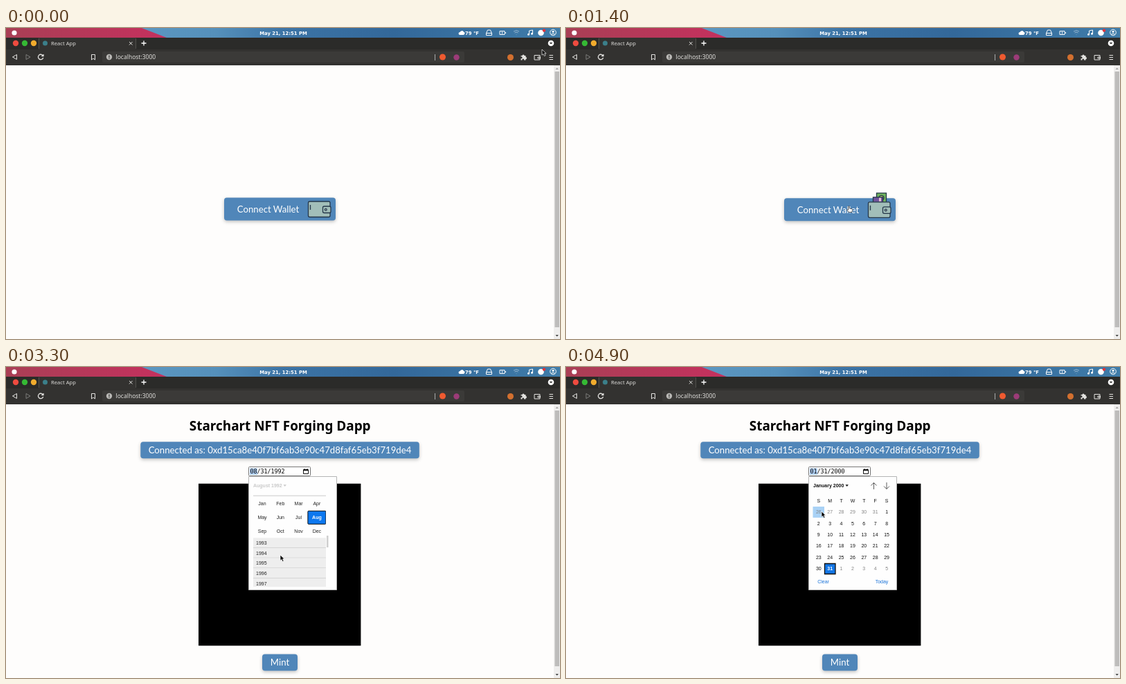
Recreate the animation shown at these times as an HTML page. Size 800 by 450 pixels, loop 5 s.

```html
<!DOCTYPE html>
<html lang="en">
<head>
<meta charset="utf-8">
<title>React App</title>
<style>
  html, body { margin: 0; width: 100%; height: 100%; overflow: hidden; background: #fefdfc; }
  svg { display: block; }
  .sys { font: bold 6.85px "DejaVu Sans", sans-serif; fill: #fff; }
  .ui { font-family: "Noto Sans", sans-serif; fill: #deddda; }
  .btn { fill: #5086b9; filter: drop-shadow(0 2px 2.5px rgba(0, 0, 0, .24)); }
  .lato { font: 13.2px Lato, sans-serif; fill: #fff; }
  .title { font: bold 18.9px "Noto Sans", "Open Sans", sans-serif; }
  .date { font: 8.3px "DejaVu Sans Mono", monospace; }
  .pick { font: 7px "Liberation Sans", Arial, sans-serif; }
  .mid { text-anchor: middle; }
  .bold { font-weight: bold; }
  .line { fill: none; stroke: #e4e3e0; stroke-width: 1; }
  .ink { stroke: #25374a; stroke-width: 1.3; }
</style>
</head>
<body>
<svg width="800" height="450" viewBox="0 0 800 450">
  <defs>
    <linearGradient id="red"><stop stop-color="#a93f55"/><stop offset="1" stop-color="#c5305e"/></linearGradient>
    <linearGradient id="blue">
      <stop offset=".25" stop-color="#5b97c1"/><stop offset=".38" stop-color="#5590bb"/><stop offset=".5" stop-color="#3c74a6"/>
      <stop offset=".7" stop-color="#33689a"/><stop offset="1" stop-color="#3f7ca9"/>
    </linearGradient>
    <clipPath id="listClip"><path d="M357 185h105v133h-105z"/></clipPath>
  </defs>

  <!-- desktop bar -->
  <path fill="url(#blue)" d="M0 0h800v14H0z"/>
  <path fill="url(#red)" d="M0 0H196L232 14H0z"/>
  <circle cx="12" cy="7" r="3.6" fill="#fff"/>
  <text class="sys mid" x="400.5" y="9.5">May 21, 12:51 PM</text>
  <path fill="#fff" d="M655.5 10a2 2 0 0 1 0-4a3 3 0 0 1 5.3-.5a2.3 2.3 0 0 1-.3 4.5z"/>
  <text class="sys" x="663" y="9.5">79 °F</text>
  <g class="line" style="stroke:#fff">
    <path d="M693.5 7.5l2-4.5h4l2 4.5v3h-8zM693.5 7.5h8"/>
    <path d="M713 4.5h7v5h-7zM721.5 6v2M716.5 5.5v3"/>
    <path opacity=".45" d="M733 5q4-3 8 0M734.5 7q2.5-2 5 0M737 9.5v.6"/>
    <path d="M755.5 9V4l5-1v5"/>
    <circle cx="790" cy="6.5" r="4.3"/><path d="M787 9.5q3-3 6 0"/>
  </g>
  <g fill="#fff">
    <circle cx="754.5" cy="9.3" r="1.5"/><circle cx="759.5" cy="8.3" r="1.5"/>
    <circle cx="790" cy="5.3" r="1.5"/><circle cx="772.5" cy="7" r="4.3"/>
  </g>
  <circle cx="777" cy="3.5" r="2.2" fill="#e0343c"/>

  <!-- browser -->
  <path fill="#2b2b29" d="M0 14h800v17H0z"/>
  <path fill="#333230" d="M0 31h800v23H0zM47 14h140v17H47z"/>
  <path stroke="#51504d" d="M47.5 15v15M187.5 15v15"/>
  <circle cx="14" cy="22" r="4.2" fill="#ee4b3f"/>
  <circle cx="27" cy="22" r="4.2" fill="#35b934"/>
  <circle cx="40" cy="22" r="4.2" fill="#f0ab2d"/>
  <circle cx="56.5" cy="22" r="3.5" fill="#3b7f8a"/>
  <text class="ui" x="65" y="24.8" font-size="7.6">React App</text>
  <path class="line" d="M178 20l4.5 4.5M182.5 20l-4.5 4.5"/>
  <path class="line" style="stroke:#fff;stroke-width:1.3" d="M195.5 22h7M199 18.5v7"/>
  <circle cx="787" cy="22" r="4.3" fill="#fff"/>
  <path fill="#2b2b29" d="M784.8 21h4.400l-2.200 2.600z"/>
  <rect x="139" y="34" width="523" height="16" rx="2" fill="#3b3a38"/>
  <path class="line" d="M15.5 38.5v7l-6-3.5z"/>
  <path class="line" opacity=".4" d="M29 38.5v7l6-3.5z"/>
  <path class="line" style="stroke-width:1.3" d="M53.3 40a3.700 3.700 0 1 0 .4 3M54 38v2.700h-2.700"/>
  <path class="line" d="M123.500 38.500h5v7.500l-2.500-2-2.500 2z"/>
  <circle cx="149" cy="42" r="4.2" fill="#b9b8b5"/>
  <path stroke="#3b3a38" stroke-width="1.2" d="M149 39.500v3.200M149 43.600v1.200"/>
  <text class="ui" x="158.5" y="45" font-size="8.5">localhost:3000</text>
  <path stroke="#aaa" d="M619.500 38v9"/>
  <circle cx="630.5" cy="42" r="4.5" fill="#ef5a30"/>
  <circle cx="650.5" cy="42.5" r="4.2" fill="#9c3b78"/>
  <circle cx="728.5" cy="42.5" r="4.5" fill="#d3702f"/>
  <path fill="#e4e3e0" d="M743.500 40h2a1.500 1.500 0 1 1 3 0h2v2a1.500 1.500 0 1 1 0 3v1.500h-2.500a1.400 1.400 0 1 0-2.500 0h-2v-2.500a1.400 1.400 0 1 0 0-2.500z"/>
  <path class="line" d="M763 39.500h8v6.500h-8zM768 42h3.500v2H768z"/>
  <path class="line" d="M784.500 39.500h5.500M784.500 42.500h5.500M784.500 45.500h5.500"/>

  <!-- page scrollbar -->
  <path fill="#efeeed" d="M791 54h9v396h-9z"/>
  <path fill="#bdbcbb" d="M792.500 63h6.500v370h-6.500z"/>
  <path fill="#a3a3a3" d="M793.500 60l2.200-2.600 2.200 2.600z"/>
  <path fill="#444" d="M793.500 444l2.200 2.600 2.200-2.600z"/>

  <g id="connect">
    <rect class="btn" x="315" y="245.5" width="161" height="33" rx="4"/>
    <text class="lato mid" x="378.5" y="267">Connect Wallet</text>
    <g id="cash">
      <path class="ink" fill="#6fb35c" d="M448.500 252h14v16h-14z"/>
      <circle class="ink" cx="455.5" cy="259" r="3.5" fill="#b9cf63"/>
      <path class="ink" fill="#70539b" d="M443.500 258h14v12h-14z"/>
      <path fill="#e7c1d3" d="M452 259h3v5h-3z"/>
    </g>
    <rect class="ink" x="436.5" y="251" width="31.5" height="22.5" rx="2" fill="#a2beb9"/>
    <path class="ink" fill="none" d="M439.500 256v7"/>
    <rect class="ink" x="457.5" y="258" width="11.5" height="9.5" rx="2" fill="#a2beb9"/>
    <circle class="ink" cx="461.8" cy="262.7" r="1.4" fill="#d7dfd8"/>
  </g>

  <g id="dapp">
    <text class="title mid" x="395.7" y="92">Starchart NFT Forging Dapp</text>
    <rect class="btn" x="194.3" y="108.3" width="402.5" height="24" rx="4"/>
    <text class="lato mid" x="395.5" y="125.3">Connected as: 0xd15ca8e40f7bf6ab3e90c47d8faf65eb3f719de4</text>
    <rect id="field" x="350.5" y="144.5" width="89" height="13" rx="1" fill="#fff"/>
    <path id="mark" fill="#b0d0f5" d="M352 146.500h11v9.500h-11z"/>
    <text id="date" class="date" x="352.5" y="154.3"></text>
    <path fill="none" stroke="#111" d="M429.500 148.500h7v6h-7zM429 149.500h8M431 147v1.500M435 147v1.500"/>
    <path d="M278 168.800h234.400v234.400H278z"/>
    <text class="mid" x="395.3" y="290" font-family="'Liberation Serif', Times, serif" font-size="18.7" fill="#fff">Virgo</text>
    <rect class="btn" x="370" y="415.5" width="51" height="24" rx="4"/>
    <text class="lato mid" x="395.5" y="432.3">Mint</text>
  </g>

  <g id="popup" class="pick">
    <path fill="#fefefe" stroke="#b5b5b5" d="M350.500 158.500h127v164h-127z"/>
    <g id="head"><text id="month" class="bold" x="357" y="174"></text><path id="caret" d="M0 170.300h4.400l-2.200 2.600z"/></g>
    <g id="days">
      <path fill="none" stroke="#333" stroke-width=".8" d="M444.500 177v-9.500M440.500 171.500l4-4 4 4M463 167v9.500M459 172.500l4 4 4-4"/>
      <path id="hover" fill="#a9d2f6" d="M356.500 202h16.500v16h-16.500z"/>
      <path fill="#1477e6" stroke="#111" stroke-width="1.3" d="M373.500 284.500h15.500v15h-15.500z"/>
      <g id="cells"></g>
      <g class="mid" fill="#1a73d8"><text x="371.5" y="313">Clear</text><text x="456" y="313">Today</text></g>
    </g>
    <g id="years">
      <g id="list" clip-path="url(#listClip)"></g>
      <path fill="#cfcfcf" d="M463 244h2.500v17H463z"/>
    </g>
  </g>

  <path id="arrow" stroke="#fff" stroke-width=".7" d="M0 0v8.200l1.900-1.700 1.500 3 1.600-.8-1.500-2.900h2.600z"/>
  <path id="hand" fill="#fff" stroke="#222" stroke-width=".7" d="M-.8 0q.8-1 1.600 0v3l3.400.8q1 .4.800 1.600l-.8 3.100h-4.400l-2.600-3.300q.4-1.200 2 0z"/>
</svg>
<script>
const $ = id => document.getElementById(id);
const show = (id, on) => $(id).style.display = on ? '' : 'none';
const move = (id, x, y) => $(id).setAttribute('transform', `translate(${x} ${y})`);
const text = (x, y, s, extra = '') => `<text x="${x}" y="${y}" ${extra}>${s}</text>`;

// Piecewise linear value of [time, ...values] keys
function track(keys, t) {
  const i = keys.findIndex(k => k[0] > t);
  if (i < 0) return keys[keys.length - 1].slice(1);
  const a = keys[i - 1], b = keys[i], p = (t - a[0]) / (b[0] - a[0]);
  return a.slice(1).map((v, j) => v + (b[j + 1] - v) * p);
}

const pointer = [
  [0, 774, 31], [100, 690, 94], [200, 549, 200], [400, 549, 200], [500, 404, 260],
  [700, 404, 260], [1200, 409, 256], [1300, 409, 256], [1500, 408, 260], [1600, 408, 260],
  [2100, 435, 151], [2200, 435, 150], [2600, 391, 162], [2800, 390, 170],
  [3300, 396, 272], [3600, 396, 274], [4100, 374, 306], [4400, 374, 306],
  [4600, 369, 211], [4700, 369, 209]
];
// Top of the 1993 row, and height of the month block under 2000
const scroll = [[0, 259.6, 0], [2900, 259.6, 0], [3300, 247.3, 0], [4200, 195, 0], [4400, 150.7, 22], [4500, 102, 48], [4600, 82.5, 60]];
const cash = [[0, 0], [700, 0], [1000, -14]];

// Calendar page: both months shown begin on a Saturday
let cells = '';
for (let i = 0; i < 49; i++) {
  const x = 364.8 + i % 7 * 16.38, row = Math.floor(i / 7), n = i - 12;
  const y = 195.6 + row * 16.45;
  const label = row ? (n < 1 ? n + 31 : n > 31 ? n - 31 : n) : 'SMTWTFS'[i];
  const fill = n === 31 ? '#fff' : row && (n < 1 || n > 31) ? '#858585' : '#111';
  cells += text(x, y, label, `class="mid${n === 31 ? ' bold' : ''}" fill="${fill}"`);
}
$('cells').innerHTML = cells;

// Year list; later rows cover the closed part of a month block
const ROW = 14.65, months = 'Jan Feb Mar Apr May Jun Jul Aug Sep Oct Nov Dec'.split(' ');
function monthBlock(picked) {
  return '<path fill="#fefefe" d="M357 0h105v60H357z"/>' + months.map((m, i) => {
    const x = 370 + i % 4 * 26.3, y = 10.5 + Math.floor(i / 4) * 20, on = i === picked;
    return (on ? `<rect x="${x - 13}" y="${y - 9.5}" width="26" height="19" rx="1" fill="#0d78ef" stroke="#111"/>` : '') +
      text(x, y + 2.6, m, `class="mid${on ? ' bold' : ''}" fill="${on ? '#fff' : '#222'}"`);
  }).join('');
}
let rows = '';
for (let y = 1990; y < 2012; y++) {
  rows += `<g id="y${y}"><path fill="#eee" d="M357 0h105v${ROW}H357z"/>` +
    `<path stroke="#d4d4d4" d="M357 ${ROW - .5}h105"/>${text(361, 9.8, y, 'fill="#222"')}` +
    (y === 1992 || y === 2000 ? `<g transform="translate(0 ${ROW})">${monthBlock(y === 1992 ? 7 : -1)}</g>` : '') + '</g>';
}
$('list').innerHTML = rows;

function draw(t) {
  const connected = t >= 1700, listOpen = t >= 2900 && t < 4700, chosen = t >= 4700;
  const onButton = t >= 500 && !connected, focused = t >= 2100 && t < 2300;
  const [x, y] = track(pointer, t);
  move('arrow', x, y);
  move('hand', x, y);
  show('arrow', !onButton);
  show('hand', onButton);

  show('connect', !connected);
  move('connect', 0, t >= 800 ? .8 : 0);
  move('cash', 0, track(cash, t)[0]);

  show('dapp', connected);
  $('field').setAttribute('stroke', focused ? '#111' : '#777');
  $('field').setAttribute('stroke-width', focused ? 1.7 : 1);
  show('mark', t >= 2100);
  $('date').textContent = chosen ? '01/31/2000' : '08/31/1992';

  show('popup', t >= 2300);
  show('days', !listOpen);
  show('years', listOpen);
  show('hover', chosen);
  $('month').textContent = chosen ? 'January 2000' : 'August 1992';
  $('head').setAttribute('fill', listOpen ? '#c9c9c9' : '#111');
  move('caret', chosen ? 403.5 : 400.5, 0);
  const [top, open] = track(scroll, t);
  for (let yr = 1990; yr < 2012; yr++)
    move('y' + yr, 0, top + (yr - 1993) * ROW + (yr > 2000 ? open : yr < 1993 ? -60 : 0));
}

function tick(now) {
  draw(Math.floor(now % 5000 / 100) * 100);
  requestAnimationFrame(tick);
}
tick(performance.now());
</script>
</body>
</html>
```
